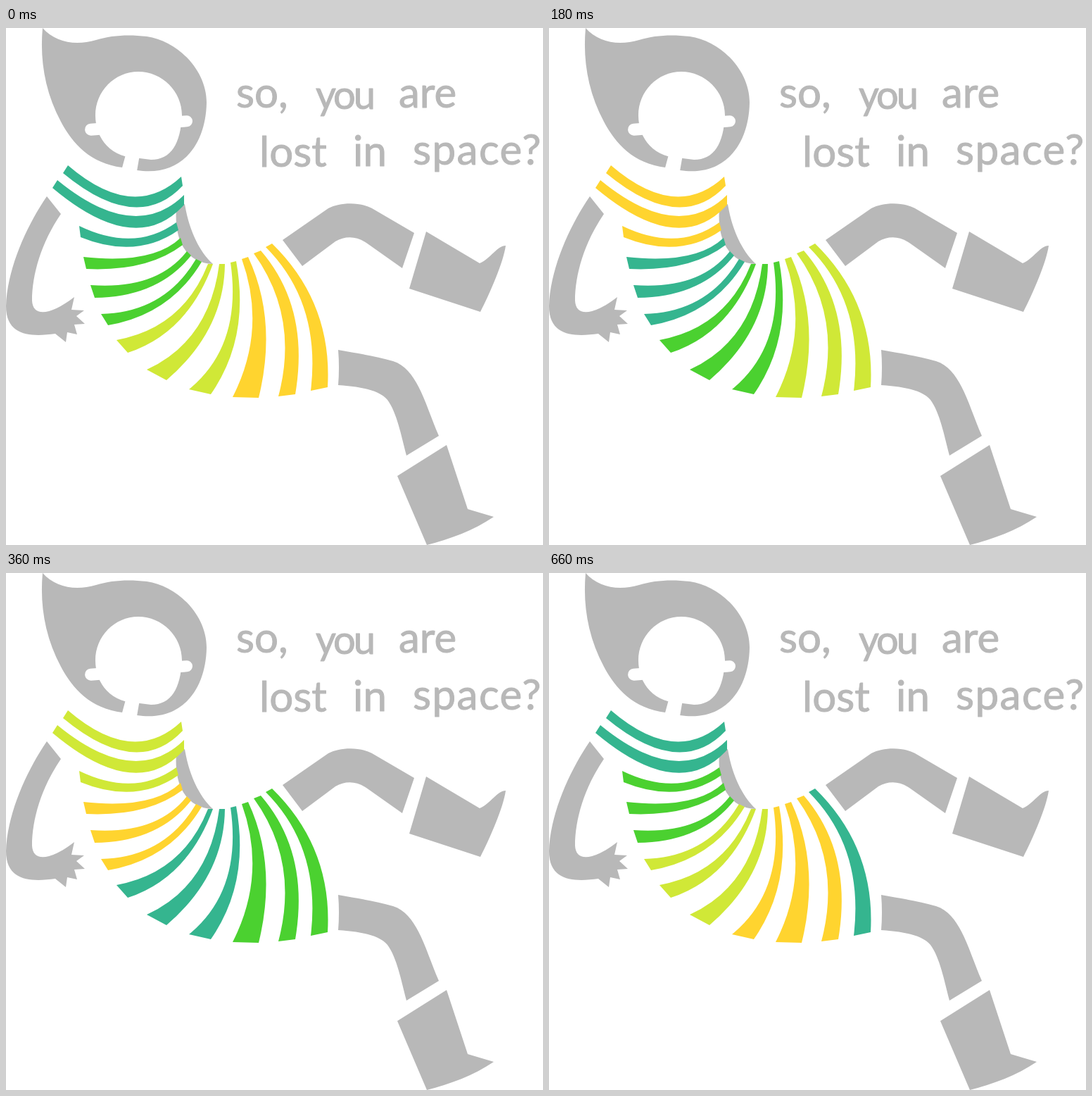
Animation of 763 by 734 pixels, one loop 0.72 s. Source, as an HTML page:

```html
<!DOCTYPE html>
<html lang="en">
<head>
<meta charset="utf-8">
<title>Lost in space</title>
<style>
  html, body { margin: 0; width: 100%; height: 100%; overflow: hidden; background: #fff; }
  svg { display: block; width: 100%; height: 100%; }
  text { font: 60px Lato, sans-serif; stroke: #b8b8b8; stroke-width: 1; stroke-linejoin: round; }
</style>
</head>
<body>
<svg viewBox="0 0 763 734" fill="#b8b8b8">
  <!-- head -->
  <path d="M52 0C70 20 98 26 128 17C150 10 175 9 200 12C245 19 285 60 285 106C284 165 250 212 186 202L165 198C120 192 95 165 78 133C55 90 48 45 52 0Z"/>
  <g fill="#fff">
    <path d="M188 62C222 62 250 90 250 124C248 164 235 187 206 187L190 185C150 185 127 158 127 124C127 90 154 62 188 62Z"/>
    <path d="M170 180H190L185.500 206L164 202Z"/>
    <rect x="112" y="135" width="36" height="17" rx="8.500" transform="rotate(-4 130 143)"/>
    <rect x="229" y="125" width="36" height="16" rx="8" transform="rotate(-4 247 133)"/>
  </g>
  <!-- arms -->
  <path d="M58 239L78 264C50 305 37 350 37 387C38 410 62 409 97 382L93 400L111 401L100 409L112 420L97 421L101 435L87 432L85 446L70 434C40 438 0 440 0 395C2 340 30 280 58 239Z"/>
  <path d="M242 257L254 250C260 287 275 318 294 335C252 333 239 296 242 257Z"/>
  <!-- legs and boots -->
  <path d="M393 301L458 256C475 247 503 247 520 256L580 291L563 341L512 305C497 295 482 295 468 303L421 338Z"/>
  <path d="M597 289L673 334C688 328 698 309 710 309C707 332 687 378 674 403L573 370Z"/>
  <path d="M472 457C500 462 525 466 550 473C585 484 596 536 615 579L569 607C562 580 555 545 542 528C530 513 500 509 472 507Q474 482 472 457Z"/>
  <path d="M626 592L656 683L693 694C665 713 630 726 598 734L556 636Z"/>
  <g id="stripes"></g>
  <text x="327" y="113">so,</text>
  <text x="440" y="115" style="font-size:56px;letter-spacing:-3px">you</text>
  <text x="558" y="113">are</text>
  <text x="360" y="197">lost</text>
  <text x="493" y="196">in</text>
  <text x="578" y="194" style="letter-spacing:1.500px">space?</text>
</svg>
<script>
const COLORS = ['#35b58f', '#4bd130', '#d0e837', '#ffd42f'];
const STEP_MS = 60;

// Each stripe lies between two quadratic curves.
const paths = [
  'M88 195Q181 275 249 211L251 224Q186 293 81 206Z',
  'M73 216Q183 306 253 237L253 251Q185 327 66 227Z',
  'M104 281Q183 319 242 276L245 287Q185 329 106 297Z',
  'M110 325Q208 336 248 298L251 308Q201 346 114 342Z',
  'M120 365Q214 372 257 317L263 323Q216 382 126 383Z',
  'M135 406Q225 404 270 328L278 332Q233 407 145 422Z',
  'M157 443Q251 426 287 335H294Q258 433 173 461Z',
  'M200 485Q289 444 303 335H311Q310 430 228 500Z',
  'M260 513Q336 451 319 333L327 331Q347 440 291 520Z',
  'M322 524Q371 428 335 328L344 325Q386 415 359 525Z',
  'M387 523Q417 410 352 320L362 316Q432 397 411 520Z',
  'M433 515Q448 390 369 311L378 306Q464 390 457 510Z'
];

const group = document.getElementById('stripes');
group.innerHTML = paths.map(d => `<path d="${d}"/>`).join('');
const stripes = [...group.children];
const count = stripes.length;

function draw() {
  const step = Math.floor(performance.now() / STEP_MS) % count;
  stripes.forEach((stripe, i) => {
    const band = Math.floor((i - step + count) % count / 3);
    stripe.setAttribute('fill', COLORS[band]);
  });
  requestAnimationFrame(draw);
}
draw();
</script>
</body>
</html>
```
